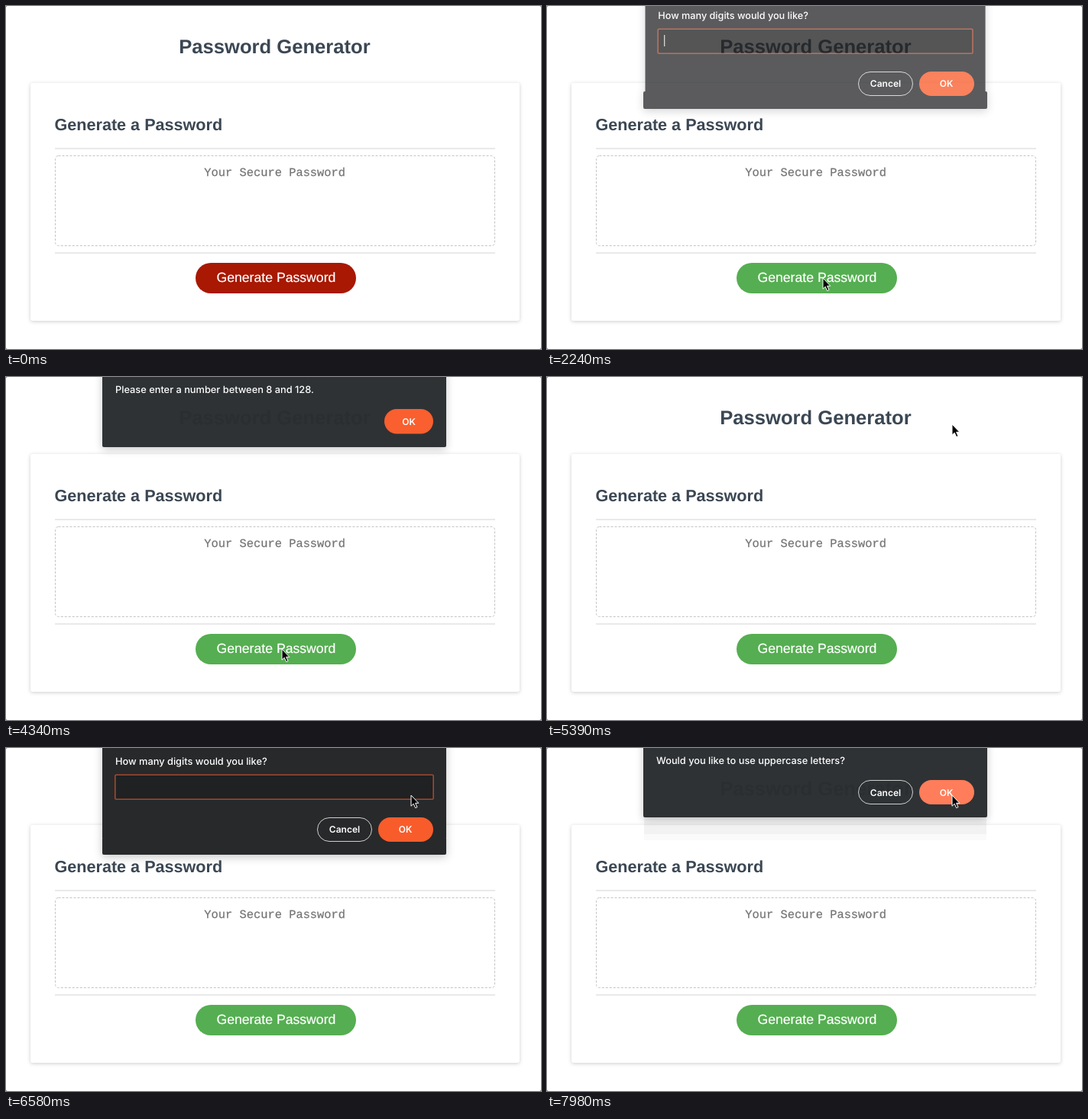
An HTML page for the animation above (8000 ms loop, 700 by 450 pixels).

```html
<!DOCTYPE html>
<html lang="en">
<head>
<meta charset="utf-8">
<title>Password Generator</title>
<style>
  html, body { margin: 0; width: 100%; height: 100%; overflow: hidden; background: #777; }
  svg { display: block; width: 700px; height: 450px; }
  text { white-space: pre; text-rendering: geometricPrecision; }
  .page { font-family: "Liberation Sans", sans-serif; fill: #3b4753; }
  .bold { font-weight: 700; }
  .card { fill: #fff; filter: drop-shadow(0 1px 2.5px rgba(0, 0, 0, .2)); }
  .rule { fill: #e9e9e9; }
  .field { fill: none; stroke: #c4c4c4; stroke-dasharray: 3 2; }
  .mono { font: 15.4px "Liberation Mono", monospace; fill: #757575; stroke: #757575; stroke-width: .25; }
  .caption { font-size: 17.65px; text-anchor: middle; fill: #fff; stroke: #fff; stroke-width: .2; }
  .dialog { font: 500 12.8px Inter, sans-serif; fill: #fff; filter: drop-shadow(0 3px 6px rgba(0, 0, 0, .22)); }
  .panel { fill: #28292b; }
  .notice .panel { fill: #2a2e31; }
  .input { fill: #202122; stroke: #a04a2f; stroke-width: 1.6; }
  .label { font: 600 12px Inter, sans-serif; text-anchor: middle; }
  .cancel { fill: none; stroke: #cfcfcf; }
</style>
</head>
<body>
<svg viewBox="0 0 700 450" xmlns="http://www.w3.org/2000/svg">
  <rect width="700" height="450" rx="2" fill="#fff"/>

  <g class="page">
    <text class="bold" x="226.3" y="62" font-size="25.6">Password Generator</text>
    <rect class="card" x="32" y="101" width="640" height="312" rx="3"/>
    <text class="bold" x="63.5" y="163" font-size="21.6">Generate a Password</text>
    <rect class="rule" x="64" y="186" width="576" height="2"/>
    <rect class="field" x="64.5" y="196.5" width="575" height="118" rx="4"/>
    <text class="mono" x="351.7" y="223" text-anchor="middle">Your Secure Password</text>
    <rect class="rule" x="64" y="323" width="576" height="2"/>
    <rect id="button" x="248" y="337" width="210" height="40" rx="20"/>
    <text class="caption" x="353.4" y="362">Generate Password</text>
  </g>

  <g id="ghost">
    <rect x="127" y="88" width="448" height="33" fill="#000" opacity=".02"/>
    <rect x="127" y="88" width="448" height="25" fill="#000" opacity=".03"/>
  </g>

  <g id="prompt" class="dialog">
    <g id="upper">
      <rect class="panel" x="126" y="-10" width="450" height="128"/>
      <text x="143" y="22">How many digits would you like?</text>
      <rect class="input" x="142.8" y="35.3" width="416.4" height="32" rx="1.5"/>
      <text id="typed" x="150" y="55"></text>
      <rect id="caret" x="151" y="43" width="1" height="15"/>
    </g>
    <g id="lower">
      <rect class="panel" x="126" y="117" width="450" height="23" rx="2"/>
      <rect class="cancel" x="407.5" y="91.5" width="71" height="31" rx="15.5"/>
      <text class="label" x="443" y="111">Cancel</text>
      <rect x="487" y="91" width="72" height="32" rx="16" fill="#f95c2b"/>
      <text class="label" x="522.5" y="111">OK</text>
    </g>
  </g>

  <g id="alert" class="dialog notice">
    <rect class="panel" x="126" y="-10" width="450" height="102" rx="2"/>
    <text x="143" y="21">Please enter a number between 8 and 128.</text>
    <rect id="alertOk" x="495" y="42" width="64" height="32.5" rx="16.2"/>
    <text class="label" x="527" y="62.5">OK</text>
  </g>

  <g id="confirm" class="dialog notice">
    <rect class="panel" x="126" y="-10" width="450" height="101" rx="2"/>
    <text x="143" y="21">Would you like to use uppercase letters?</text>
    <rect class="cancel" x="407.5" y="42.5" width="71" height="31" rx="15.5"/>
    <text class="label" x="443" y="62.5">Cancel</text>
    <rect x="487" y="42" width="72" height="32" rx="16" fill="#ff7b57"/>
    <text class="label" x="522.5" y="62.5">OK</text>
  </g>

  <g id="cursor">
    <circle id="ring" r="30" fill="none" stroke="#222" stroke-width="1.8"/>
    <path d="M0 0V14.2L3.2 11.2L5.7 16.6L8 15.6L5.6 10.3H9.8Z" fill="#000" stroke="#fff" stroke-linejoin="round"/>
  </g>
</svg>
<script>
  const LOOP = 8000, TICK = 70;
  const el = id => document.getElementById(id);
  const set = (id, name, value) => el(id).setAttribute(name, value);
  const show = (id, on) => set(id, 'visibility', on ? 'inherit' : 'hidden');

  // Tables of [time, value]; each value holds until the next time.
  const opacity = {
    prompt: [[0, 0], [2170, .35], [2240, .76], [2310, .97], [2380, 1], [4200, .5], [4270, 0],
             [5810, .97], [5880, 1], [7840, .5], [7910, 0]],
    alert: [[0, 0], [4270, .8], [4340, .98], [4410, 1], [5180, .4], [5250, 0]],
    confirm: [[0, 0], [7910, .8], [7980, .98]]
  };
  const typing = [[0, ''], [7210, '1'], [7420, '12']];
  const carets = [[0, 0], [2170, 1], [2870, 0], [3360, 1], [3850, 0],
                  [5810, 1], [6370, 0], [6860, 1], [7350, 0], [7420, 1]];
  const presses = [[0, 0], [1960, 1], [2100, 0], [5040, 1], [5180, 0]];
  const moves = [
    { start: 70, end: 560, from: [392, 398], to: [361, 357] },
    { start: 4620, end: 4900, from: [361, 357], to: [530, 62] }
  ];

  const at = (table, t) => table.findLast(([time]) => time <= t)[1];

  function cursorAt(t) {
    const { start, end, from, to } = moves.findLast(m => m.start <= t) || moves[0];
    const p = Math.min(1, Math.max(0, (t - start) / (end - start)));
    const eased = p * p * (3 - 2 * p);
    return from.map((v, i) => v + (to[i] - v) * eased);
  }

  function render(t) {
    for (const id in opacity) {
      const value = at(opacity[id], t);
      set(id, 'opacity', value);
      show(id, value > 0);
    }
    // The upper half is squeezed a little while the first prompt slides in.
    const opening = t >= 2170 && t < 2310;
    set('upper', 'transform', opening ? 'translate(3.9 -5) scale(.989 1)' : '');
    set('lower', 'transform', opening ? 'translate(0 -5)' : '');

    const text = at(typing, t);
    el('typed').textContent = text;
    set('caret', 'x', 151 + 8 * text.length);
    show('caret', at(carets, t));

    const [x, y] = cursorAt(t);
    set('cursor', 'transform', `translate(${x} ${y})`);
    show('cursor', t >= 70);
    show('ring', at(presses, t));
    set('button', 'fill', t >= 70 && (y < 377 || t > 560) ? '#55ae51' : '#a81803');
    set('alertOk', 'fill', t >= 4900 ? '#ff7b57' : '#f95c2b');
    show('ghost', t >= 7980);
  }

  const origin = performance.now();
  function frame() {
    const t = (performance.now() - origin) % LOOP;
    render(Math.floor(t / TICK) * TICK);
    requestAnimationFrame(frame);
  }
  frame();
</script>
</body>
</html>
```
